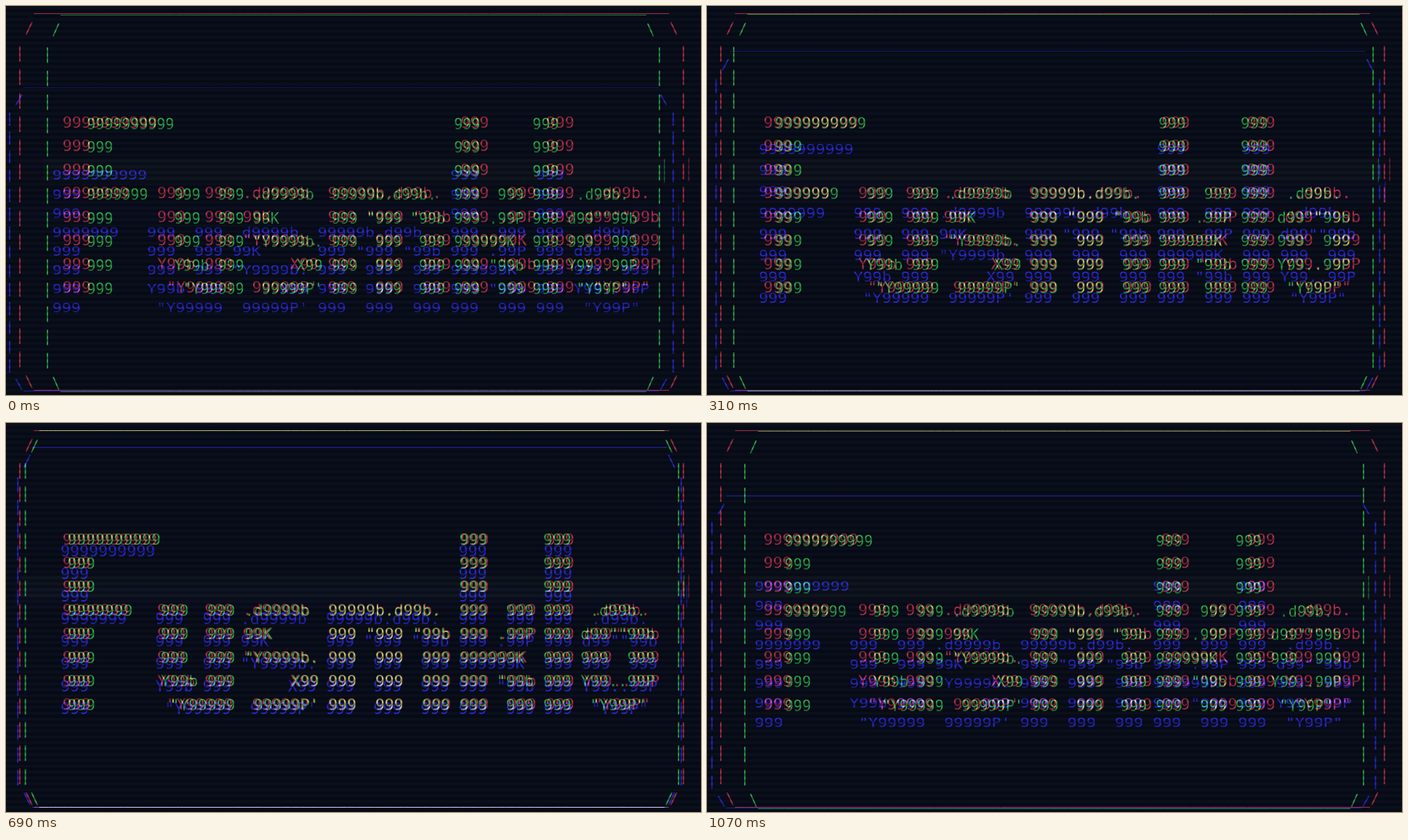
Recreate the animation shown at these times as an HTML page with a canvas. Size 956x536 px, loop 1140 ms.

```html
<!DOCTYPE html>
<html lang="en">
<head>
<meta charset="utf-8">
<title>Fusmklo</title>
<style>
html, body { margin: 0; width: 100%; height: 100%; overflow: hidden; background: #0a0e1a; }
canvas { display: block; }
</style>
</head>
<body>
<canvas id="stage" width="956" height="536"></canvas>
<script>
const W = 956, H = 536, LOOP = 1140, STEPS = 15;
const COL = 13.043, ROW = 32.45, LEFT = 12.5, BASE = 5.7;
const COLS = 71, ROWS = 17;
const ctx = document.getElementById('stage').getContext('2d');

// [column, first row, lines]
const letters = [
  [5, 5, ['9999999999', '999', '999', '9999999', '999', '999', '999', '999']],
  [15, 8, ['999  999', '999  999', '999  999', 'Y99b 999', ' "Y99999']],
  [24, 8, ['.d9999b', '99K', '"Y9999b.', '     X99', ' 99999P\'']],
  [33, 8, ['99999b.d99b.', '999 "999 "99b', '999  999  999', '999  999  999', '999  999  999']],
  [47, 5, ['999', '999', '999', '999  999', '999 .99P', '999999K', '999 "99b', '999  999']],
  [56, 5, Array(8).fill('999')],
  [60, 8, [' .d99b.', 'd99""99b', '999  999', 'Y99..99P', ' "Y99P"']]
];

function buildRows() {
  const grid = Array.from({ length: ROWS }, () => Array(COLS).fill(' '));
  const put = (col, row, text) => [...text].forEach((ch, i) => { grid[row][col + i] = ch; });
  const rule = '_'.repeat(COLS - 4);
  put(2, 0, rule);
  put(1, 1, '/');
  put(COLS - 2, 1, '\\');
  for (let r = 2; r < ROWS - 1; r++) {
    put(0, r, '|');
    put(COLS - 1, r, '|');
  }
  put(1, ROWS - 1, '\\' + rule + '/');
  for (const [col, row, lines] of letters) lines.forEach((line, i) => put(col, row + i, line));
  return grid.map(cells => cells.join(''));
}

const rows = buildRows();

function drawLayer(color, glow, sx, sy, dx, dy) {
  ctx.setTransform(sx, 0, 0, sy, dx, dy);
  ctx.fillStyle = glow;
  ctx.fillRect(LEFT, 209, COLS * COL, 32.5);
  ctx.fillStyle = color;
  rows.forEach((text, r) => ctx.fillText(text, LEFT, BASE + r * ROW));
  ctx.globalAlpha = 0.6;
  ctx.fillRect(LEFT + COLS * COL, 209, 1.4, 32.5);
  ctx.globalAlpha = 1;
}

const scan = document.createElement('canvas');
scan.width = W;
scan.height = H;
const sc = scan.getContext('2d');
for (let y = 0; y < H; y++) {
  const dark = 0.24 - 0.2 * Math.cos((y - 10) / (ROW / 4) * Math.PI * 2);
  sc.fillStyle = `rgba(2,3,9,${dark})`;
  sc.fillRect(0, y, W, 1);
}

// Spread of the colour channels: 1 at the loop ends, 0 halfway.
function spreadAt(ms) {
  let k = 0;
  while (k < STEPS - 1 && ms >= Math.round((k + 1) * 23 / 3) * 10) k++;
  return Math.abs(1 - k / 7.5);
}

function draw(ms) {
  const u = spreadAt(ms);
  ctx.setTransform(1, 0, 0, 1, 0, 0);
  ctx.globalCompositeOperation = 'source-over';
  ctx.fillStyle = '#0c111f';
  ctx.fillRect(0, 0, W, H);

  ctx.font = '21.665px "DejaVu Sans Mono", monospace';
  ctx.globalCompositeOperation = 'lighter';
  ctx.filter = 'blur(0.45px)';
  drawLayer('#b82430', 'rgba(60,10,20,0.05)', 1, 1, 0, 0);

  const gx = 1 - 0.0778 * u, mid = 475.5;
  drawLayer('#26ac32', 'rgba(20,60,20,0.1)', gx, 1, mid + 2.5 * u - mid * gx, 2 * u);

  const by = 1 - (116 * u - 15 * u * u) / 519, floor = 530;
  drawLayer('#221cc4', 'rgba(15,15,70,0.08)', 1, by, -14 * u, floor + u - floor * by);

  ctx.filter = 'none';
  ctx.setTransform(1, 0, 0, 1, 0, 0);
  ctx.globalCompositeOperation = 'source-over';
  ctx.drawImage(scan, 0, 0);
}

const start = performance.now();
function tick() {
  draw((performance.now() - start) % LOOP);
  requestAnimationFrame(tick);
}
tick();
</script>
</body>
</html>
```
